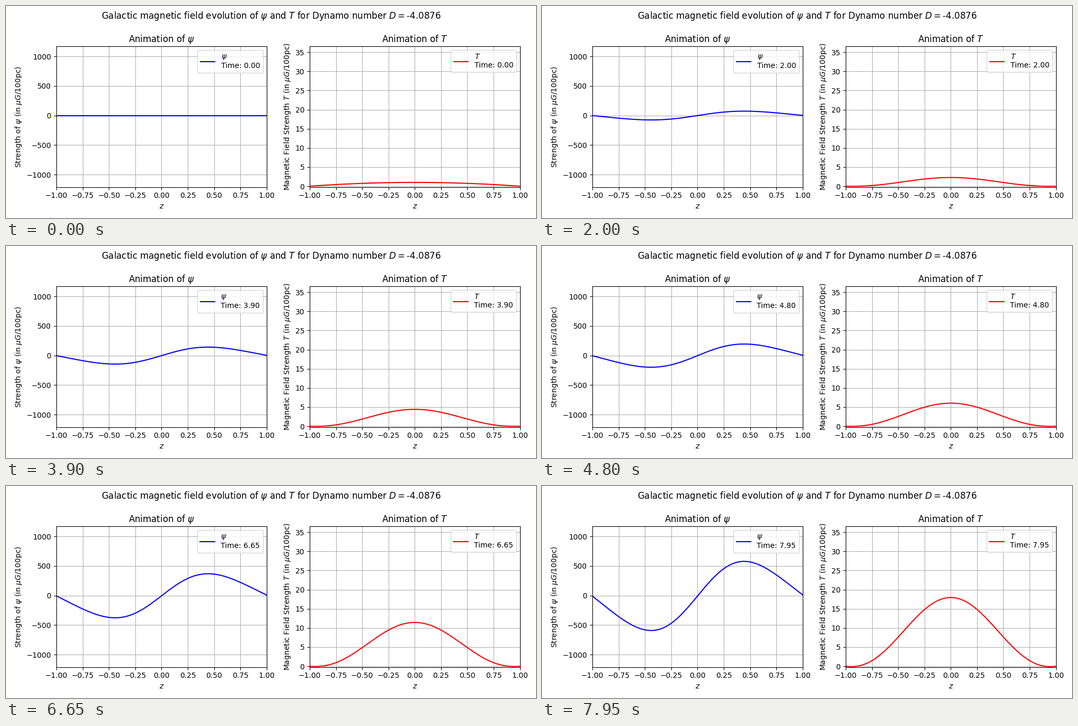
Recreate the animation shown at these times as a matplotlib script. Size 1000 px wide and 400 px high, loop 8 s.

```python
import numpy as np
import matplotlib.pyplot as plt
from matplotlib.animation import FuncAnimation

FRAMES = 160
STEP_MS = 50
GROWTH = 0.3465      # growth rate of the dominant dynamo mode
SETTLE = 9.0         # decay rate of the initial transient
T_AMP = 1.142
PSI_AMP = 37.2

z = np.linspace(-1, 1, 201)
T_START = 1 - z**2
T_MODE = 1 - 2.985 * z**2 + 3.035 * z**4 - 1.216 * z**6 + 0.166 * z**8
PSI_MODE = ((np.sin(np.pi * z) + 0.097 * np.sin(2 * np.pi * z)) / 1.018
            + 0.018 * z**5 - 0.016 * (1 - z**2))


def fields(t):
    """Return psi and T over z at time t."""
    grow, fade = np.exp(GROWTH * t), np.exp(-SETTLE * t)
    psi = PSI_AMP * PSI_MODE * (grow - fade)
    toroidal = T_AMP * T_MODE * (grow - fade) + T_START * fade
    return psi, toroidal


def make_panel(ax, symbol, color, ylabel, ylim):
    line, = ax.plot(z, 0 * z, color=color, label=legend_text(symbol, 0))
    ax.set_title(f"Animation of {symbol}")
    ax.set_xlabel("$z$")
    ax.set_ylabel(ylabel)
    ax.set_xlim(-1, 1)
    ax.set_ylim(*ylim)
    ax.grid(True)
    label = ax.legend(loc="upper right").get_texts()[0]
    return line, label, symbol


def legend_text(symbol, t):
    return f"{symbol}\nTime: {t:.2f}"


fig, (ax_psi, ax_t) = plt.subplots(1, 2, figsize=(10, 4), dpi=100)
fig.suptitle(r"Galactic magnetic field evolution of $\psi$ and $T$ "
             r"for Dynamo number $D = $-4.0876")
panels = [
    make_panel(ax_psi, r"$\psi$", "blue",
               r"Strength of $\psi$ (in $\mu G$/100pc)", (-1212, 1168)),
    make_panel(ax_t, "$T$", "red",
               r"Magnetic Field Strength $T$ (in $\mu G$/100pc)",
               (-0.23, 36.5)),
]
fig.tight_layout()


def update(frame):
    t = frame * STEP_MS / 1000
    artists = []
    for (line, label, symbol), values in zip(panels, fields(t)):
        line.set_ydata(values)
        label.set_text(legend_text(symbol, t))
        artists += [line, label]
    return artists


anim = FuncAnimation(fig, update, frames=FRAMES, interval=STEP_MS,
                     repeat=True, repeat_delay=0)
plt.show()
```
